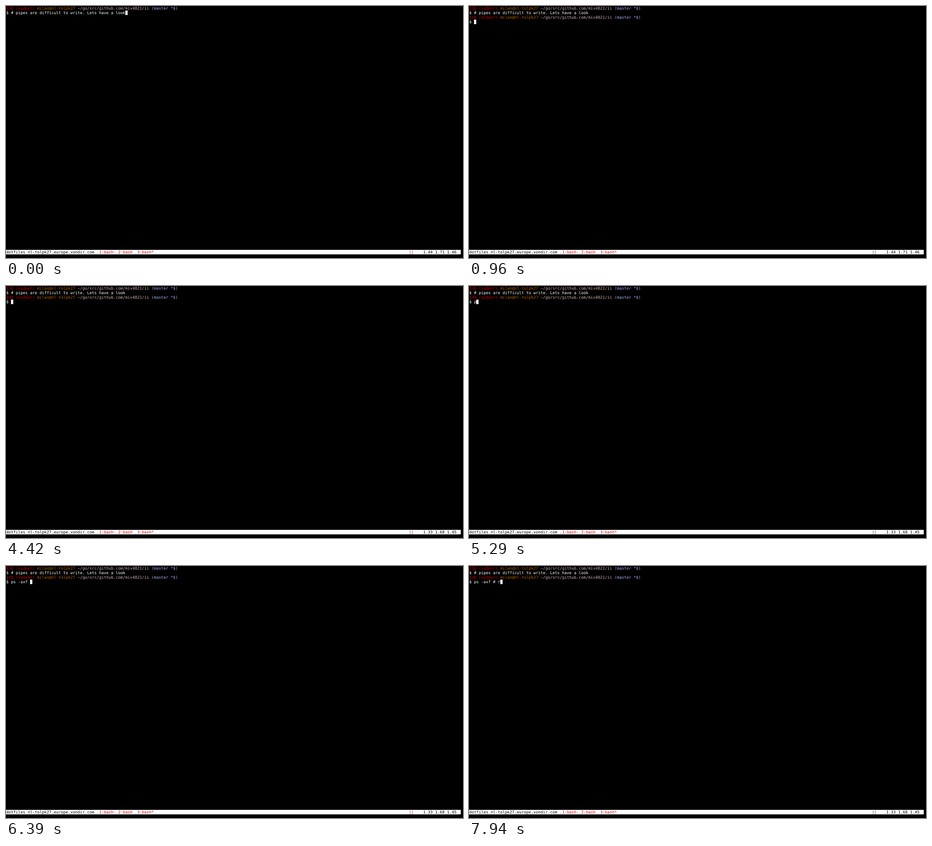
Recreate the animation shown at these times as an HTML page. Size 1007 by 556 pixels, loop 8000 ms.

```html
<!DOCTYPE html>
<html lang="en">
<head>
<meta charset="utf-8">
<title>Terminal</title>
<style>
  html, body { margin: 0; width: 100%; height: 100%; overflow: hidden; background: #000; }
  #term {
    position: relative; width: 1007px; height: 556px; overflow: hidden; background: #000;
    font: 8.72px/10px "DejaVu Sans Mono", monospace;
    text-rendering: geometricPrecision; font-variant-ligatures: none;
  }
  #term span { position: absolute; white-space: pre; }
  #bar { position: absolute; left: 0; top: 538px; width: 1002px; height: 10px; background: #fff; }
  #cursor { position: absolute; width: 5px; height: 10px; background: #fff; }
</style>
</head>
<body>
<div id="term"><div id="bar"></div><div id="cursor"></div></div>
<script>
const LOOP = 8000, CELL_W = 5.25, CELL_H = 10.15, LEFT = 0.4;
const WHITE = '#fff', RED = '#cd0000';
const term = document.getElementById('term');
const cursor = document.getElementById('cursor');

function put(row, col, text, color) {
  const el = document.createElement('span');
  el.style.left = LEFT + col * CELL_W + 'px';
  el.style.top = Math.round(row * CELL_H + 0.6) + 'px';
  el.style.color = color;
  el.textContent = text;
  term.appendChild(el);
  return el;
}

function prompt(row) {
  return [
    put(row, 0, '130 (sudoer)', RED),
    put(row, 13, 'milan@nl-tolpk27', '#af5f00'),
    put(row, 30, '~/go/src/github.com/miv4821/ii', '#d7afaf'),
    put(row, 61, '(master *$)', '#afafff'),
    put(row + 1, 0, '$', WHITE)
  ];
}

prompt(0);
put(1, 2, '# pipes are difficult to write. Lets have a look', WHITE);
const secondPrompt = prompt(2);
const input = put(3, 2, '', WHITE);

const STATUS = 53;
put(STATUS, 0, 'dotfiles nl-tolpk27.europe.vondir.com .', '#000');
put(STATUS, 39, '1:bash- 2:bash  3:bash*', RED);
put(STATUS, 169, '|', '#333');
put(STATUS, 170, '|', RED);
const load = put(STATUS, 175, '', '#000');

// Time of each keystroke and how much of the command is then visible
const COMMAND = 'ps -axf # r';
const KEYS = [
  [3570, 1], [4420, 0], [4780, 1], [5110, 0], [5290, 1], [5370, 2], [5480, 3],
  [5690, 4], [5890, 5], [6080, 6], [6200, 7], [6390, 8], [7600, 9], [7760, 10], [7940, 11]
];

function moveCursor(row, col) {
  cursor.style.left = Math.round(LEFT + col * CELL_W) + 'px';
  cursor.style.top = Math.round(row * CELL_H) + 'px';
}

function render(t) {
  let typed = 0;
  for (const [at, count] of KEYS) if (t >= at) typed = count;
  for (const el of secondPrompt) el.style.visibility = t < 960 ? 'hidden' : 'visible';
  input.textContent = COMMAND.slice(0, typed);
  load.textContent = t < 3530 ? '1.44 1.71 1.46' : '1.33 1.68 1.45';
  if (t < 910) moveCursor(1, 50);
  else if (t < 960) moveCursor(2, 0);
  else moveCursor(3, 2 + typed);
}

const start = performance.now();
function tick() {
  render((performance.now() - start) % LOOP);
  requestAnimationFrame(tick);
}
tick();
</script>
</body>
</html>
```
